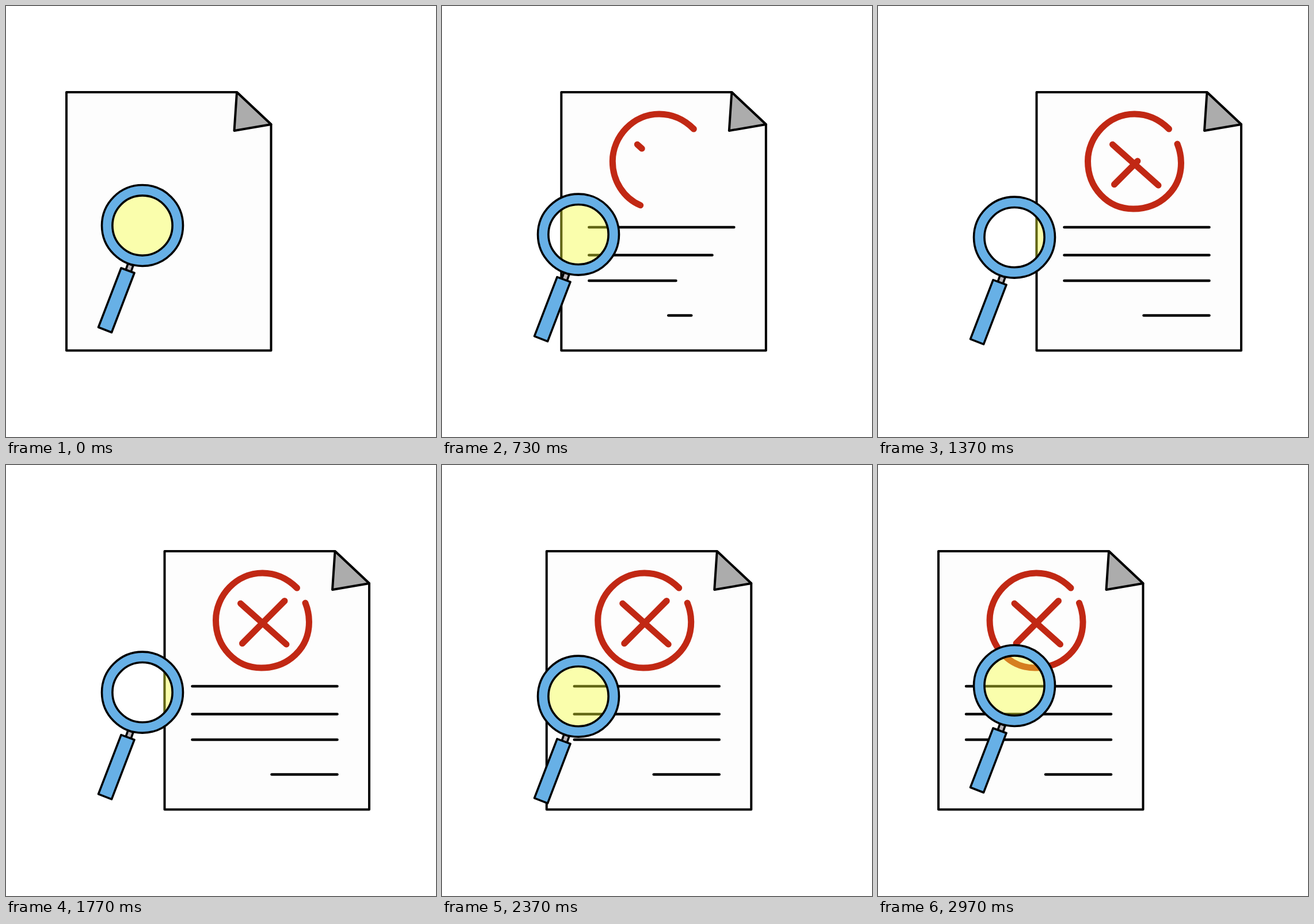
An HTML page without scripts that plays this animation: 747 px wide and 750 px high, repeating every 3.01 s.

```html
<!DOCTYPE html>
<html lang="en">
<head>
<meta charset="utf-8">
<title>Document review</title>
<style>
  @property --t { syntax: "<number>"; inherits: true; initial-value: 0; }

  html, body { margin: 0; width: 100%; height: 100%; overflow: hidden; background: #fff; }

  /* --t is a clock of 90 ticks; every moving part is derived from it */
  svg { display: block; width: 747px; height: 750px; animation: clock 3.01s infinite; }
  @keyframes clock {
    0% { --t: 0; animation-timing-function: step-end; }
    .8% { --t: 0; animation-timing-function: steps(89, jump-start); }
    99.55%, 100% { --t: 89; }
  }

  .slide {
    transform: translateX(calc(170.5px * (clamp(0, (var(--t) - 10) / 20, 1) - clamp(0, (var(--t) - 60) / 20, 1))));
  }

  /* one bob per 30 ticks, rounded off at the bottom */
  .bob {
    --p: calc(var(--t) - 30 * (clamp(0, var(--t) - 29, 1) + clamp(0, var(--t) - 59, 1)));
    transform: translateY(calc(1px * min(1.95 * var(--p), 14 + .6 * var(--p), 32 - .6 * var(--p), 58.5 - 1.95 * var(--p))));
  }

  /* strokes start at tick --s and take 20 ticks */
  .draw path {
    stroke-dasharray: 100 300;
    stroke-dashoffset: calc(100px * (1 - clamp(0, (var(--t) - var(--s)) / 20, 1)));
    opacity: clamp(0, var(--t) - var(--s), 1);
  }

  .ink { stroke: #000; stroke-width: 4; stroke-linejoin: round; }
  .text { fill: none; stroke: #000; stroke-width: 4.5; stroke-linecap: round; }
  .mark { fill: none; stroke: #c12814; stroke-width: 11; stroke-linecap: round; stroke-linejoin: round; }
  .tool { stroke: #000; stroke-width: 3.6; }
</style>
</head>
<body>
<svg viewBox="0 0 747 750">
  <defs>
    <clipPath id="page">
      <path class="slide" d="M103 148H401L462.500 205V601.500H103Z"/>
    </clipPath>
  </defs>

  <g class="slide">
    <path class="ink" fill="#fdfdfd" d="M105 150H401L460.500 206V599.500H105Z"/>
    <path class="ink" fill="#acacac" d="M401 150L396.500 217L460.500 206Z"/>
    <g class="draw text">
      <path style="--s:0" pathLength="100" d="M153 385H405"/>
      <path style="--s:5" pathLength="100" d="M153 433.500H405"/>
      <path style="--s:10" pathLength="100" d="M153 478H405"/>
      <path style="--s:15" pathLength="100" d="M291 538.500H405"/>
    </g>
    <g class="draw mark">
      <path style="--s:10" pathLength="100" d="M335 214C318 197 297 188 275 188C230 188 194 227 194 270C194 316 228 353 273 353C320 353 356 319 356 273C356 262 353.500 250 349.500 240"/>
      <path style="--s:20" pathLength="100" d="M237 241L316.500 312"/>
      <path style="--s:30" pathLength="100" d="M240 310.500L313.500 236.500"/>
    </g>
  </g>

  <!-- the glass only tints the page -->
  <g clip-path="url(#page)">
    <circle class="bob" cx="237" cy="382" r="53" fill="#f5ff32" fill-opacity=".4"/>
  </g>

  <g class="bob">
    <path class="tool" fill="#b8b4b9" d="M212 448L221 451.500L217 463L208 459.500Z"/>
    <path class="tool" fill="#67b0e6" stroke-linejoin="round" d="M200 456L223 464.500L183.500 568L160.500 559Z"/>
    <g fill="none">
      <circle cx="237" cy="382" r="61.300" stroke="#000" stroke-width="22"/>
      <circle cx="237" cy="382" r="61.300" stroke="#67b0e6" stroke-width="14.800"/>
    </g>
  </g>
</svg>
</body>
</html>
```
